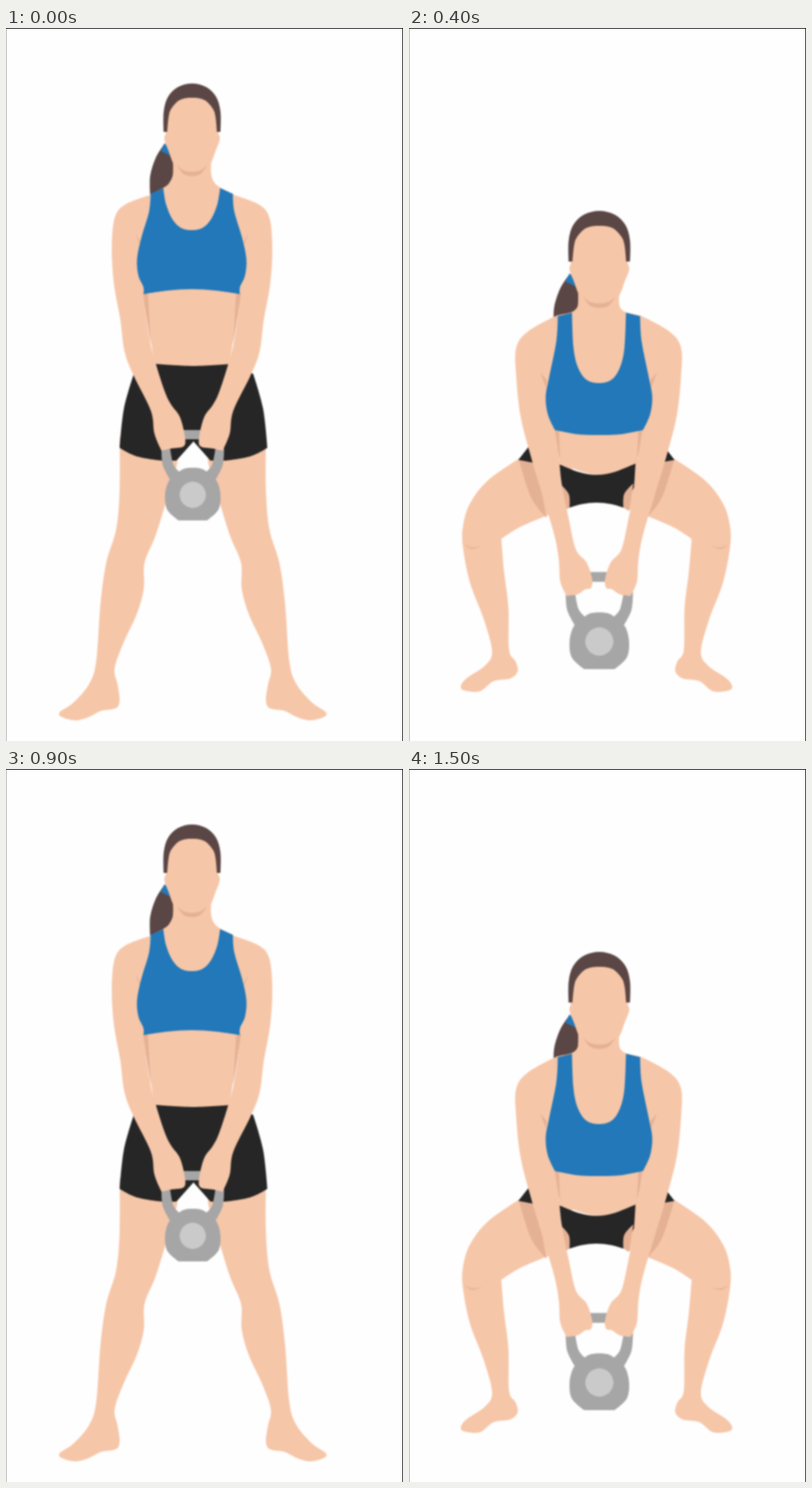
These frames come from a looping animation (559x1002 px, 1600 ms). An HTML page with a canvas:

```html
<!DOCTYPE html>
<html lang="en">
<head>
<meta charset="utf-8">
<title>Kettlebell squat</title>
<style>
html, body { margin: 0; width: 100%; height: 100%; overflow: hidden; background: #fefefe; }
canvas { display: block; }
</style>
</head>
<body>
<canvas id="stage" width="559" height="1002"></canvas>
<script>
const W = 559, H = 1002, HOLD = 400, SOFT = 'blur(0.9px)';
const SKIN = '#f6c6a8', SHADE = '#e5b195', BLUE = '#2278b8', BLACK = '#262626',
  HAIR = '#5a4644', STEEL = '#a6a6a6', PLATE = '#cacaca', PAPER = '#fefefe';

// The body is mirrored about an axis, so outlines hold "distance,y" for one side.
// "!" marks a sharp corner.
const parse = text => text.trim().split(/\s+/).map(item => {
  const [d, y] = item.split(',').map(parseFloat);
  return { x: -d, y, sharp: item.endsWith('!') };
});
const flip = pts => pts.map(p => ({ ...p, x: -p.x }));

function trace(path, pts) {
  const n = pts.length;
  const handle = (i, dir) => {
    const p = pts[i], next = pts[(i + 1) % n], prev = pts[(i + n - 1) % n];
    if (p.sharp) return [p.x, p.y];
    return [p.x + dir * (next.x - prev.x) / 6, p.y + dir * (next.y - prev.y) / 6];
  };
  path.moveTo(pts[0].x, pts[0].y);
  for (let i = 0; i < n; i++) {
    const j = (i + 1) % n;
    path.bezierCurveTo(...handle(i, 1), ...handle(j, -1), pts[j].x, pts[j].y);
  }
  path.closePath();
}

function shape(color, ...outlines) {
  const path = new Path2D();
  outlines.forEach(pts => trace(path, pts));
  return { color, path };
}

const left = (color, text) => shape(color, parse(text));
const pair = (color, text) => shape(color, parse(text), flip(parse(text)));
const whole = (color, text) => {
  const half = parse(text);
  return shape(color, half.concat(flip(half.filter(p => p.x)).reverse()));
};
const part = (axis, ...shapes) => ({ axis, shapes, sx: 1, sy: 1, dy: 0 });
const fit = (base, axis, sx, sy, dy) => ({ ...base, axis, sx, sy, dy });

const ponytail = part(262,
  left(HAIR, '39,163! 31,170 26,185 27,208 38,226! 59,235! 59,208 51,182'),
  left(BLUE, '39,162! 31,169 29,180! 44,173!'));

const head = part(262,
  whole(SKIN, '0,90 28,100 36,144 39,156 33,173 25,193 12,204 0,207'),
  whole(SHADE, '0,208 12,205 21,193! 12,200 0,202'),
  whole(HAIR, '0,78 20,83 34,97 40,118 40,146! 35,146! 33,125 29,113 17,101 0,98'));

const bell = part(263,
  whole(STEEL, '0,565 18,565! 18,578! 0,578'),
  pair(STEEL, '44,590! 42,615 30,638! 16,626! 27,614 32,590!'),
  whole(STEEL, '0,618 14,620 24,628 34,637 39,656 36,677 20,692! 0,692'),
  whole(PLATE, '0,637.5 13,643 18.5,656 13,669 0,674.5'));

const standing = [
  ponytail,
  part(263, pair(SKIN, `103,575! 103,650 108,705 122,752 130,810 136,890 146,922 168,948
    187,961 185,968 166,973 148,969 130,960 112,957 105,953 103,942 106,922 110,900
    98,865 79,824 69,788 68,752 53,715 40,674 22,613! 18,575!`)),
  part(262, whole(SKIN, '27,185! 27,206 32,218 41,225! 59,234! 80,300! 69,372! 51,482!')),
  part(264, whole(BLACK, '0,475 53,472! 84,486! 98,535 104,590! 80,602 45,608! 24,608! 0,581!')),
  bell,
  part(262,
    pair(SKIN, `57,234! 94,248 109,267 113,310 110,360 101,410 95,455 82,489 58,538
      53,570 43,594! 30,591 12,588 10,575 17,547 29,530 38,512 51,472 60,436 69,366! 74,310!`),
    pair(SHADE, '69,373! 62,373! 58,445!'),
    pair(SHADE, '80,288! 73,300! 73,305!')),
  part(261.5, whole(BLUE, `0,284 15,281 27,269 36,248 40,225! 58,233! 60,258 71,295 77,325
    75,348 68,364 68,374! 34,369 0,367`)),
  head
];

const squatting = [
  fit(ponytail, 268, 1.08, 1.05, 175),
  part(264,
    pair(SKIN, `104,602! 152,635 178,668 188,700 188,730 178,780 159,830 147,876 157,896
      183,914 191,925 186,931 164,932 145,918 121,914 111,904 114,890 123,874 124,815
      130,765 134,718! 109,702 72,686! 38,674! 34,610!`),
    pair(BLACK, '96,589! 84,612! 110,607!'),
    pair(SHADE, '109,608! 84,612! 70,689! 92,660'),
    pair(SHADE, '187,724! 176,730 161,728! 176,732')),
  part(267, whole(SKIN, '29,365! 29,388 33,396 40,400! 59,404! 77,510! 61,562! 54,612! 0,628')),
  part(264,
    whole(BLACK, '0,628 25,624 55,612! 53,645! 38,674! 20,669 0,667'),
    pair(SHADE, '52,640! 39,655 38,674! 46,679!')),
  fit(bell, 268, 1.075, 1.075, 157),
  part(267,
    pair(SKIN, `59,404! 99,426 116,449 116,490 110,545 96,600 78,660 62,714 56,748 54,778
      45,798! 30,796 19,789 11,787 9,775 17,751 32,733 42,690 52,640 57,590 61,555! 73,500!`),
    pair(SHADE, '62,563! 56,564! 54,612!'),
    pair(SHADE, '82,484! 73,495! 74,506!')),
  part(267.5, whole(BLUE, `0,499 18,494 30,476 36,448 38,400! 58,405! 60,440 70,490 75,518
    72,543 62,565! 30,571 0,572`)),
  fit(head, 268, 1.08, 1.05, 175)
];

function render(parts) {
  const page = Object.assign(document.createElement('canvas'), { width: W, height: H });
  const pen = page.getContext('2d');
  for (const { axis, shapes, sx, sy, dy } of parts) {
    pen.setTransform(sx, 0, 0, sy, axis, dy);
    for (const { color, path } of shapes) {
      pen.fillStyle = color;
      pen.fill(path);
    }
  }
  return page;
}

const ctx = document.getElementById('stage').getContext('2d');
const poses = [standing, squatting].map(render);

function bar(color, x, y, w, h) {
  ctx.fillStyle = color;
  ctx.fillRect(x, y, w, h);
}

function draw(now) {
  bar(PAPER, 0, 0, W, H);
  ctx.filter = SOFT;
  ctx.drawImage(poses[Math.floor(now / HOLD) % poses.length], 0, 0);
  ctx.filter = 'none';
  bar('#b4b4b4', 0, 0, 1, H);
  bar('#1c1c1c', W - 1, 0, 1, H);
  bar('#0c0c0c', 0, 0, W, 1);
}

const start = performance.now();
function tick() {
  draw(performance.now() - start);
  requestAnimationFrame(tick);
}
tick();
</script>
</body>
</html>
```
